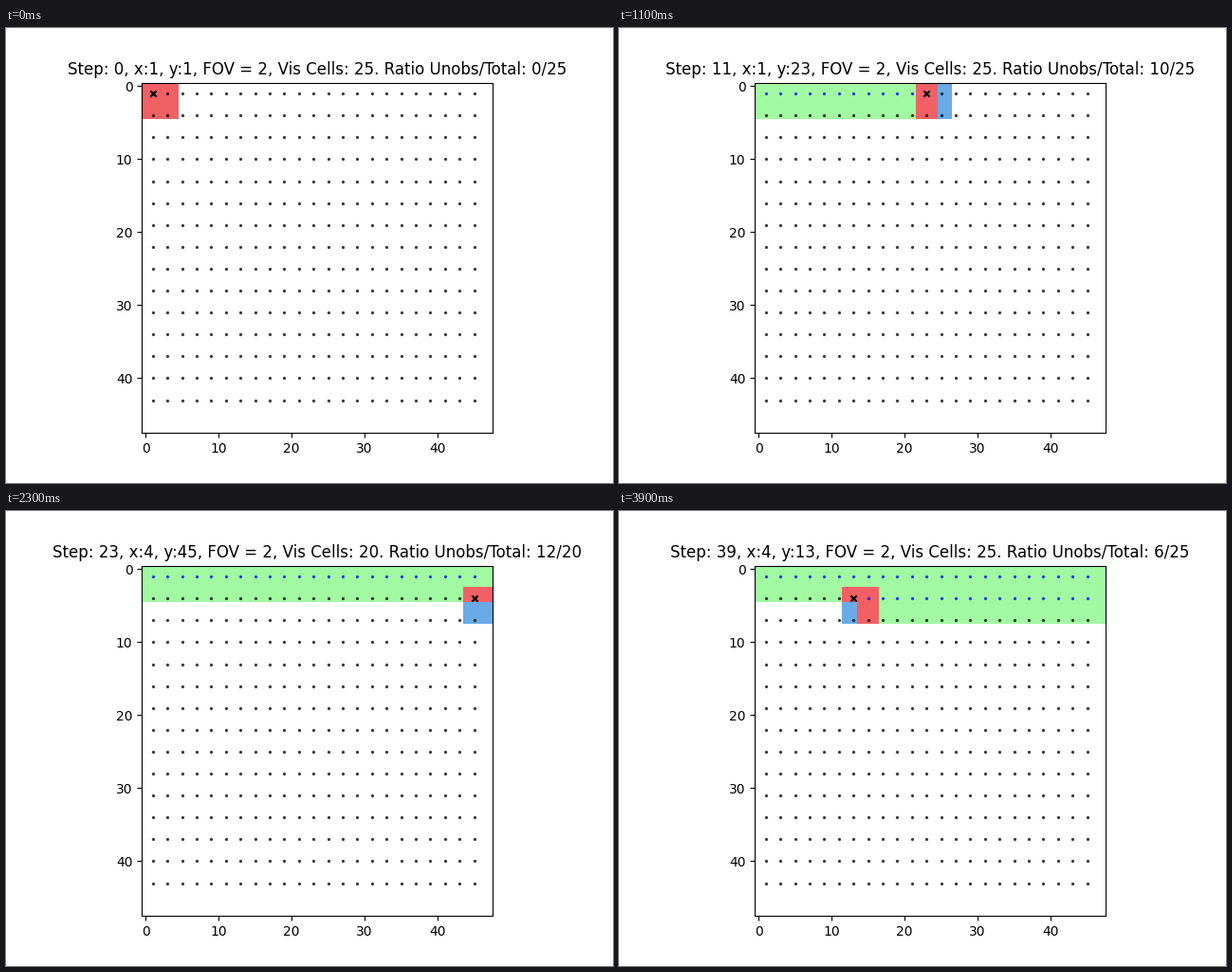
Animation of 640 by 480 pixels, one loop 4 s. Source, as a matplotlib script:

```python
import numpy as np
import matplotlib.pyplot as plt
from matplotlib.animation import FuncAnimation
from matplotlib.colors import ListedColormap

SIZE, FOV, STEPS = 48, 2, 40
ROWS = range(1, 45, 3)
COLS = range(1, 47, 2)
EMPTY, SEEN, OVERLAP, FRESH = range(4)
CMAP = ListedColormap(["#ffffff", "#a1faa1", "#f16065", "#6aaae6"])

# Sweep the waypoints row by row, reversing direction on every other row
path = [(r, c) for i, r in enumerate(ROWS)
        for c in (COLS if i % 2 == 0 else reversed(COLS))]


def window(pos):
    return tuple(slice(p - FOV + 1, p + FOV + 2) for p in pos)


def scene(step):
    """Cell states at a step and the number of newly seen cells."""
    grid = np.full((SIZE, SIZE), EMPTY)
    for pos in path[:max(step, 1)]:
        grid[window(pos)] = SEEN
    view = grid[window(path[step])]
    fresh = view == EMPTY
    view[:] = np.where(fresh, FRESH, OVERLAP)
    return grid, fresh.sum(), view.size


def xy(points):
    return np.array([(c, r) for r, c in points]).reshape(-1, 2)


fig, ax = plt.subplots(figsize=(6.4, 4.8), dpi=100)
image = ax.imshow(np.zeros((SIZE, SIZE)), cmap=CMAP, vmin=0, vmax=3,
                  interpolation="nearest")
dot = dict(s=2, alpha=0.65)
todo = ax.scatter([], [], color="black", **dot)
done = ax.scatter([], [], color="blue", **dot)
agent = ax.scatter([], [], s=20, color="black", marker="x")
title = ax.set_title("")
ax.set_xlim(-0.5, SIZE - 0.5)
ax.set_ylim(SIZE - 0.5, -0.5)


def draw(step):
    grid, fresh, total = scene(step)
    row, col = path[step]
    image.set_data(grid)
    todo.set_offsets(xy(path[step:]))
    done.set_offsets(xy(path[:step]))
    agent.set_offsets([(col, row)])
    title.set_text(f"Step: {step}, x:{row}, y:{col}, FOV = {FOV}, "
                   f"Vis Cells: {total}. Ratio Unobs/Total: {fresh}/{total}")
    return image, todo, done, agent, title


anim = FuncAnimation(fig, draw, frames=STEPS, interval=100, repeat=True,
                     repeat_delay=0, init_func=lambda: draw(0))
plt.show()
```
